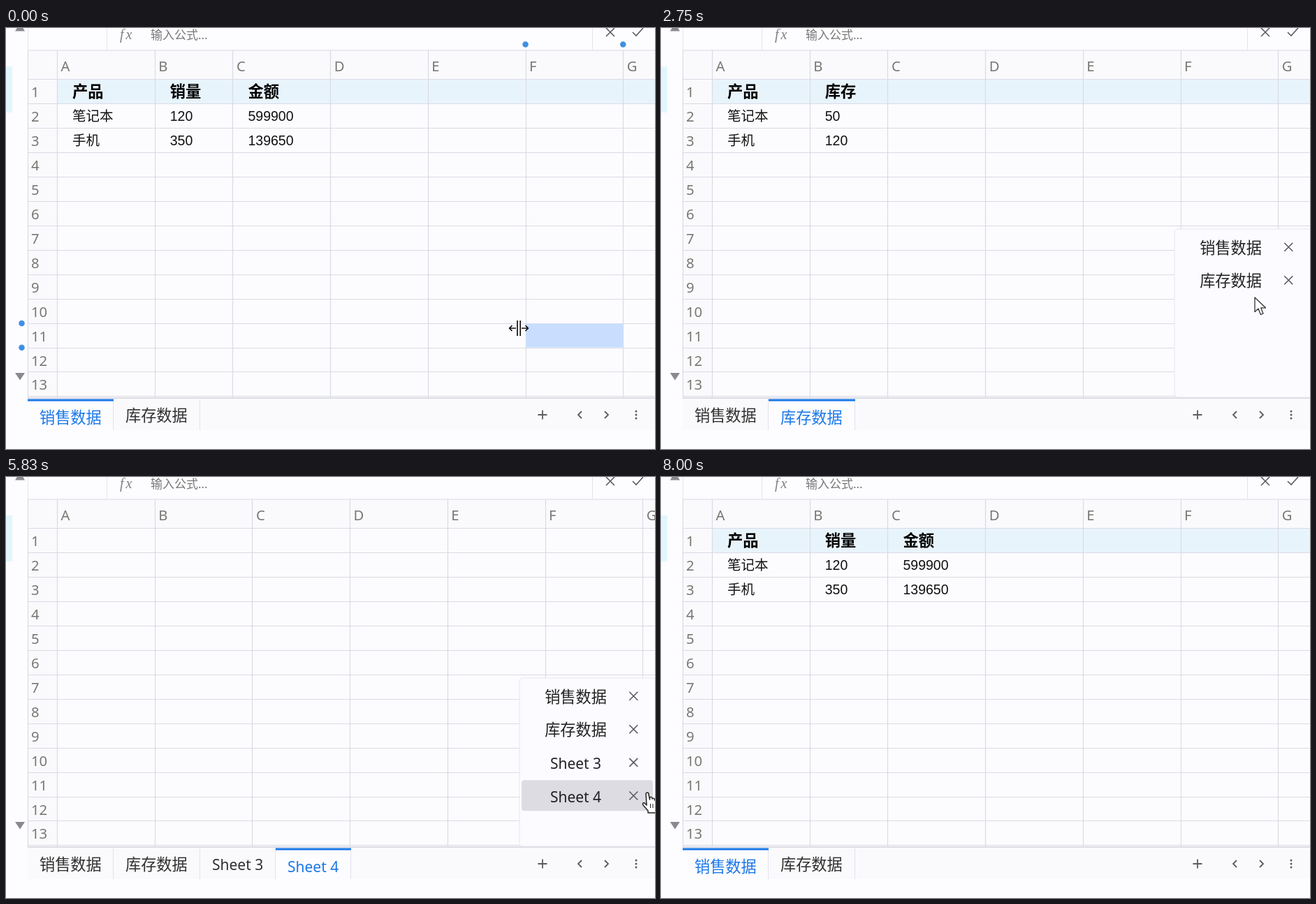
An HTML page that plays this animation: 929 px wide and 603 px high, repeating every 8.41 s.

```html
<!DOCTYPE html>
<html lang="zh-CN">
<head>
<meta charset="utf-8">
<title>Sheet tabs</title>
<style>
html, body { margin: 0; width: 100%; height: 100%; overflow: hidden; background: #fdfcff; }
svg { display: block; width: 929px; height: 603px; }
.ui { font-family: 'Noto Sans', 'Noto Sans CJK SC', sans-serif; }
.cell { font-family: 'Liberation Sans', 'Noto Sans CJK SC', sans-serif; }
.fx { font-family: 'Liberation Serif', serif; font-style: italic; letter-spacing: 3px; }
</style>
</head>
<body>
<svg id="stage" viewBox="0 0 929 603"></svg>
<script>
const LOOP = 8410, FPS = 12;
const LEFT = 73, TOP = 74.3, UNIT = 139.7, ROW = 34.93, BOTTOM = 529;
const BLUE = '#1a78e8', LINE = '#dadae4', INK = '#5c5c60';

const SHEETS = [
  { name: '销售数据', narrow: true, rows: [['产品', '销量', '金额'], ['笔记本', '120', '599900'], ['手机', '350', '139650']] },
  { name: '库存数据', narrow: true, rows: [['产品', '库存'], ['笔记本', '50'], ['手机', '120']] },
  { name: 'Sheet 3', rows: [] },
  { name: 'Sheet 4', rows: [] }
];
const TAB_X = [31, 154, 278, 386, 494];

// Pointer path: tick, x, y
const PATH = [
  [0, 734, 430], [10, 222, 547], [14, 222, 547], [22, 880, 556], [25, 903, 552], [29, 903, 552],
  [30, 900, 530], [33, 850, 386], [35, 838, 364], [36, 836, 362], [40, 745, 540], [42, 737, 551],
  [47, 777, 551], [62, 777, 551], [63, 792, 552], [65, 866, 552], [66, 866, 552], [69, 921, 452],
  [70, 918, 452], [72, 899, 452], [74, 899, 452], [78, 899, 406], [79, 899, 406], [85, 902, 530],
  [88, 902, 545], [89, 902, 545], [90, 901, 550], [95, 875, 600], [102, 875, 600]
];

const step = (k, list) => list.reduce((v, [from, to]) => k >= from ? to : v, 0);
const activeAt = k => step(k, [[13, 1], [50, 2], [55, 3], [74, 0]]);
const countAt = k => step(k, [[0, 2], [50, 3], [55, 4], [74, 3], [79, 2]]);

function pointerAt(k) {
  if ((k >= 66 && k < 69) || k >= 96) return null;
  const i = PATH.findIndex((p, n) => n > 0 && k <= p[0]);
  const [a, ax, ay] = PATH[i - 1], [b, bx, by] = PATH[i];
  let u = (k - a) / (b - a);
  if (b - a >= 8) u = u * u * (3 - 2 * u);
  return { x: ax + (bx - ax) * u, y: ay + (by - ay) * u };
}

const rect = (x, y, w, h, fill, extra = '') =>
  `<rect x="${x}" y="${y}" width="${w}" height="${h}" fill="${fill}" ${extra}/>`;
const path = (d, color = INK, width = 1.6, fill = 'none') =>
  `<path d="${d}" fill="${fill}" stroke="${color}" stroke-width="${width}"/>`;
const circle = (x, y, r, fill, extra = '') =>
  `<circle cx="${x}" cy="${y}" r="${r}" fill="${fill}" ${extra}/>`;
const text = (x, y, s, size, fill, cls = 'ui', extra = '') =>
  `<text x="${x}" y="${y}" font-size="${size}" fill="${fill}" class="${cls}" ${extra}>${s}</text>`;
const cross = (x, y) => path(`M${x - 6} ${y - 6}l12 12m0 -12l-12 12`);
const labelSize = s => s.startsWith('Sheet') ? 21 : 22.2;

const colX = (sheet, i) => LEFT + UNIT * (i - (sheet.narrow && i > 1 ? 0.2 : 0));
const rowY = i => TOP + ROW * i;

function chrome() {
  return rect(0, 0, 929, 603, '#fdfcff') + rect(0, 55, 9, 66, '#e2f6fd') +
    path('M31.5 0V576M144.5 0V31M839.5 0V31', '#e4e4ec', 1) +
    path('M13 4.5h14l-3 -5h-8z', 'none', 0, '#8a8990') +
    path('M13 494h14l-7 10.5z', 'none', 0, '#8a8990') +
    text(163, 16, 'fx', 20, '#808080', 'fx') +
    text(207, 16, '输入公式...', 17, '#777') +
    cross(865, 6) + path('M897 6l5 5l10 -11');
}

function grid(sheet) {
  let s = rect(31, 32, 898, 498, '#fcfcff') + rect(31, 32, 898, 42, '#fafafd') + rect(31, 74, 42, 455, '#fafafd');
  if (sheet.rows.length) s += rect(73, 74, 856, 35, '#e8f4fb');
  let d = 'M31 32H929';
  for (let i = 0; i < 14; i++) d += `M31 ${Math.round(rowY(i)) - .5}H929`;
  for (let i = 0; i < 7; i++) d += `M${Math.round(colX(sheet, i)) + .5} 32V529`;
  s += path(d, LINE, 1.2);
  for (let i = 0; i < 7; i++) s += text(colX(sheet, i) + 5.5, 61.5, 'ABCDEFG'[i], 20.3, '#777873');
  for (let i = 0; i < 13; i++) s += text(36, rowY(i) + 25, i + 1, 20.3, '#777873');
  sheet.rows.forEach((row, r) => row.forEach((v, c) => {
    const x = colX(sheet, c) + 22;
    s += r ? text(x, rowY(r) + 24, v, 19.5, '#111', 'cell')
           : text(x, 99, v, 22.3, '#000', 'cell', 'font-weight="700"');
  }));
  return s + path('M31.5 32V530', LINE, 1.2);
}

function hoverCell(sheet, p) {
  let c = 0;
  while (c < 5 && colX(sheet, c + 1) <= p.x + 10) c++;
  const r = Math.min(12, Math.floor((p.y - TOP) / ROW));
  const x0 = colX(sheet, c), x1 = colX(sheet, c + 1), y0 = rowY(r), y1 = rowY(r + 1);
  const dots = [[x0, 23.5], [x1, 23.5], [22.5, y0 - .7], [22.5, y1 - .7]];
  return (p.y < BOTTOM ? rect(x0 + .7, y0, x1 - x0 - .7, ROW - 1, '#c9deff') : '') +
    dots.map(([x, y]) => circle(x, y, 5, '#3f8fe2', 'stroke="#fdfcff" stroke-width="1.5"')).join('');
}

function tabs(active, count) {
  let s = rect(31, 530, 898, 46, '#fafafd') + rect(31, 529, 898, 2, '#dcdce4');
  for (let i = 0; i < count; i++) {
    const x = TAB_X[i], w = TAB_X[i + 1] - x, on = i === active, name = SHEETS[i].name;
    if (on) s += rect(x, 531, w, 45, '#fdfcff') + rect(x, 531.5, w, 3, BLUE);
    s += text(x + 17, on ? 566 : 563, name, labelSize(name), on ? BLUE : '#303030');
    s += path(`M${x + w - .5} ${on ? 535 : 532}V576`, '#e2e2ea', 1);
  }
  return s;
}

const near = (p, x) => p && Math.hypot(p.x - x, p.y - 554) < 17;

function buttons(p) {
  const halo = x => near(p, x) ? circle(x, 554, 17, '#dff0fd') : '';
  const tint = x => near(p, x) ? BLUE : INK;
  return halo(768) + path('M761.5 554h13M768 547.5v13', tint(768), 1.8) +
    path('M824 549l-5 5l5 5M857 549l5 5l-5 5', INK, 1.8) +
    halo(902) + [549, 554, 559].map(y => circle(902, y, 1.5, tint(902))).join('');
}

const itemY = i => 339 + 47.6 * (i - 1);

function itemAt(p, count) {
  if (!p || p.x < 738 || p.x > 926) return -1;
  for (let i = 0; i < count; i++) if (p.y >= itemY(i) && p.y <= itemY(i) + 44) return i;
  return -1;
}

function menu(count, hot) {
  let s = rect(735, 288, 200, 241, '#fcfbff', 'rx="5" stroke="#e6e6ee"');
  for (let i = 0; i < count; i++) {
    const y = itemY(i), name = SHEETS[i].name;
    if (i === hot) s += rect(738, y, 188, 44, '#dcdce2', 'rx="4"');
    s += text(815.5, y + 31.3, name, labelSize(name), '#222', 'ui', 'text-anchor="middle"') + cross(898.3, y + 22.3);
  }
  return s;
}

const CURSORS = {
  arrow: path('M0 0V20.5L5 16L8.5 24.5L12 23L8.7 14.8H15.5Z', '#333', 1.3, '#fff'),
  hand: path('M-2 1.5Q-1 -1 1.5 .5L3.5 10V7Q5.5 5.5 7 7.5V9Q9 7.5 10.5 9.5V11Q13 9.5 14.5 12V20Q14 24 12 26V29H1V26L-6 18Q-7.5 15 -4.5 14.5L-1 18Z', '#222', 1.5, '#fff') +
    path('M4.5 16v6M8 16v6M11.5 16v6', '#222', 1),
  grab: path('M-6 12L-11 4Q-11.5 1 -8.5 1L-5.5 4L-8 -7Q-6.5 -10 -4.5 -8L-2.5 -1V-10Q-.5 -13 1.5 -10V-1L3.5 -9Q6 -11 7 -8L5.5 0L8.5 -6Q11 -7 11 -4L8 7V13H-6Z', '#222', 1.5, '#fff'),
  resize: path('M-2.5 -11V11M2.5 -11V11', '#fff', 4) + path('M-2 -11V11M2.2 -11V11', '#111', 1.7) +
    path('M-4 0H-13M-9.5 -4L-13.5 0L-9.5 4M4 0H13M9.5 -4L13.5 0L9.5 4', '#111', 1.7)
};

function cursorKind(k, p, sheet, hot) {
  if (hot >= 0 || near(p, 768) || near(p, 902)) return 'hand';
  if (p.y > BOTTOM) return k < 14 && p.x > 154 && p.x < 278 ? 'grab' : 'arrow';
  const edge = [1, 2, 3, 4, 5, 6].some(i => Math.abs(colX(sheet, i) - p.x) < 10);
  return k < 13 && edge ? 'resize' : 'arrow';
}

function render(k) {
  const p = pointerAt(k), active = activeAt(k), count = countAt(k), sheet = SHEETS[active];
  const open = k >= 27 && k < 88, hot = open ? itemAt(p, count) : -1;
  let s = chrome() + grid(sheet);
  if (k < 13) s += hoverCell(sheet, p);
  s += tabs(active, count) + buttons(p);
  if (open) s += menu(count, hot);
  if (p) s += `<g transform="translate(${p.x} ${p.y})" stroke-linejoin="round">${CURSORS[cursorKind(k, p, sheet, hot)]}</g>`;
  return s;
}

const stage = document.getElementById('stage');
let shown = -1;
function tick() {
  const t = performance.now() % LOOP;
  const k = Math.floor((t + 3.5) * FPS / 1000);
  if (k !== shown) stage.innerHTML = render(shown = k);
  requestAnimationFrame(tick);
}
tick();
</script>
</body>
</html>
```
